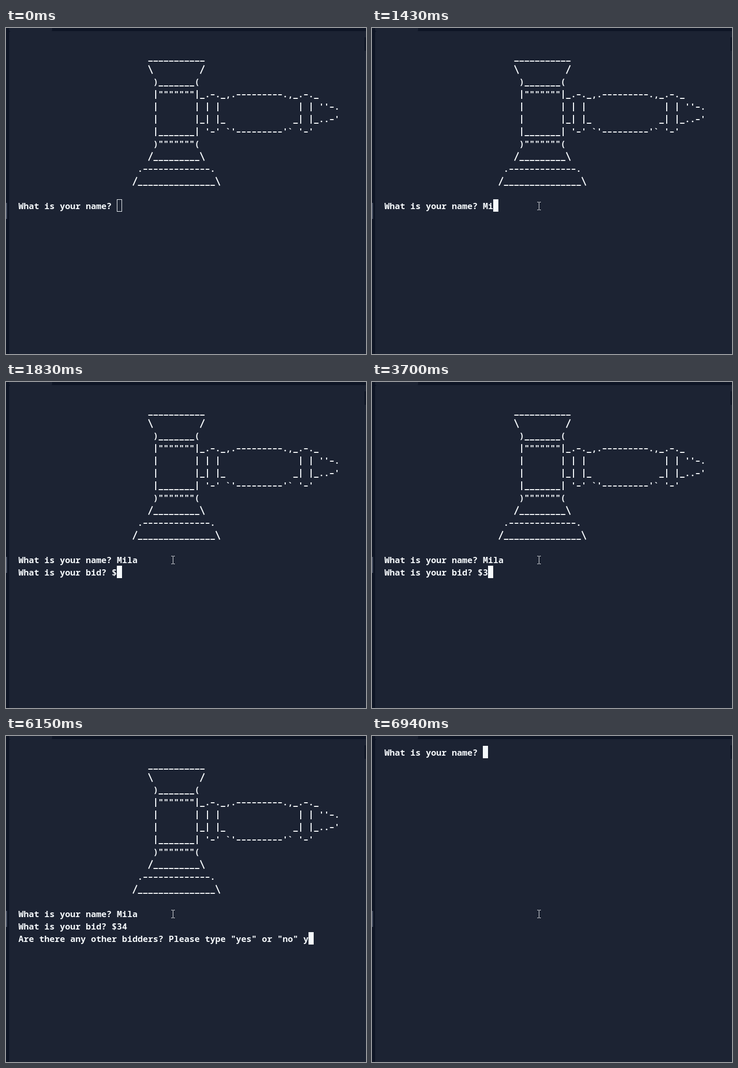
Write an HTML page with a canvas that moves like this. It is 695x630 px and loops after 8000 ms.

```html
<!DOCTYPE html>
<html lang="en">
<head>
<meta charset="utf-8">
<title>Auction terminal</title>
<style>
  html, body { margin: 0; width: 100%; height: 100%; overflow: hidden; background: #0e1525; }
  canvas { display: block; }
</style>
</head>
<body>
<canvas id="stage" width="695" height="630"></canvas>
<script>
const LOOP = 8000, LEFT = 24, TOP = 19, CELL = 10, ROW = 24, BASE = 19;
const WHITE = '#f5f9fc', PANEL = '#1c2333', EDGE = '#0e1525';
const ctx = document.getElementById('stage').getContext('2d');

// Each row of the gavel: starting column and text, from row 1 down
const gavel = [
  [25, '___________'],
  [25, '\\         /'],
  [26, ')_______('],
  [26, '|"""""""|_.-._,.---------.,_.-._'],
  [26, "|       | | |               | | ''-."],
  [26, "|       |_| |_             _| |_..-'"],
  [26, "|_______| '-' `'---------'` '-'"],
  [26, ')"""""""('],
  [25, '/_________\\'],
  [23, '.-------------.'],
  [22, '/_______________\\'],
];

// Straight glyphs as lines x1, y1, x2, y2 from the cell's baseline
const strokes = {
  '_': [.7, 2, 9.3, 2],
  '-': [1.5, -5, 8.5, -5],
  '|': [5, -14, 5, 3],
  '/': [1.3, 2.5, 8.7, -14],
  '\\': [1.3, -14, 8.7, 2.5],
};

// Prompts with the time they appear and the time of each keystroke
const prompts = [
  { at: 0, ask: 'What is your name? ', answer: 'Mila', keys: [1160, 1430, 1500, 1570] },
  { at: 1830, ask: 'What is your bid? $', answer: '34', keys: [3700, 3900] },
  { at: 4100, ask: 'Are there any other bidders? Please type "yes" or "no" ', answer: 'yes', keys: [6150, 6280, 6410] },
];
const SHOW = 130, ARRIVE = 560, CLICK = 760, FOCUS = 830, RELEASE = 1020, CLEAR = 6940;

function rect(color, x, y, w, h) {
  ctx.fillStyle = color;
  ctx.fillRect(x, y, w, h);
}

function write(row, col, text) {
  const y = TOP + row * ROW + BASE;
  ctx.fillStyle = ctx.strokeStyle = WHITE;
  ctx.lineWidth = 2;
  ctx.beginPath();
  [...text].forEach((ch, i) => {
    const x = LEFT + (col + i) * CELL;
    if (!strokes[ch]) return ctx.fillText(ch, x, y);
    const [x1, y1, x2, y2] = strokes[ch];
    ctx.moveTo(x + x1, y + y1);
    ctx.lineTo(x + x2, y + y2);
  });
  ctx.stroke();
}

function caret(row, col, filled) {
  const x = LEFT + col * CELL, y = TOP + row * ROW;
  if (filled) return rect(WHITE, x, y, CELL, ROW);
  ctx.strokeStyle = WHITE;
  ctx.lineWidth = 1;
  ctx.strokeRect(x + .5, y + .5, CELL - 1, ROW - 1);
}

function frame() {
  rect(EDGE, 0, 0, 695, 630);
  ctx.fillStyle = PANEL;
  ctx.beginPath();
  ctx.roundRect(6, 6, 700, 640, 4);
  ctx.roundRect(6, -6, 83, 12, 2);
  ctx.fill();
  rect(EDGE, 692, 18, 3, 26);
  rect('#4b5366', 0, 338, 2, 31);
}

function pointer(t) {
  if (t < SHOW) return;
  const p = Math.min(1, Math.floor((t - SHOW) / (ARRIVE - SHOW) * 6) / 6);
  const left = (1 - p) ** 2;
  const x = Math.round(322 + 197 * left), y = Math.round(336 + 199 * left);
  if (t >= CLICK && t < RELEASE) {
    ctx.fillStyle = 'rgba(255, 255, 0, .35)';
    ctx.beginPath();
    ctx.arc(320, 343, 15, 0, Math.PI * 2);
    ctx.fill();
  }
  rect('#e4e6ea', x, y + 1, 1, 14);
  for (const dy of [0, 15]) {
    rect('#e4e6ea', x - 3, y + dy, 3, 1);
    rect('#e4e6ea', x + 1, y + dy, 3, 1);
  }
}

function draw(t) {
  frame();
  ctx.font = '600 16.667px "Noto Sans Mono", "DejaVu Sans Mono", monospace';
  if (t >= CLEAR) {
    write(0, 0, prompts[0].ask);
    caret(0, prompts[0].ask.length, true);
  } else {
    gavel.forEach(([col, text], i) => write(i + 1, col, text));
    const shown = prompts.filter(p => t >= p.at);
    shown.forEach((p, i) => {
      const line = p.ask + p.answer.slice(0, p.keys.filter(k => t >= k).length);
      write(13 + i, 0, line);
      if (i === shown.length - 1) caret(13 + i, line.length, t >= FOCUS);
    });
  }
  pointer(t);
}

const start = performance.now();
function tick() {
  draw((performance.now() - start) % LOOP);
  requestAnimationFrame(tick);
}
tick();
</script>
</body>
</html>
```
